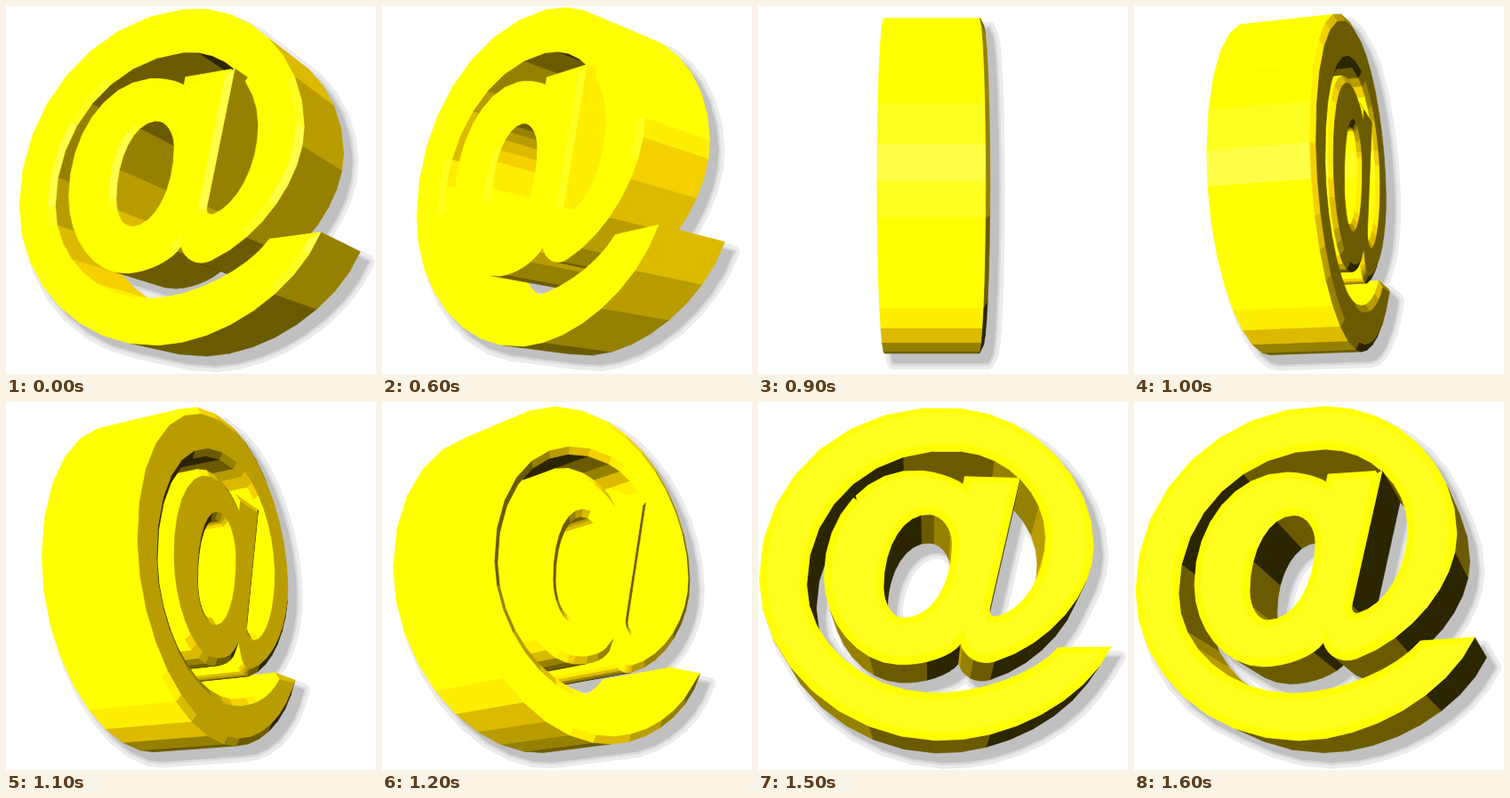
Animation of 416 by 413 pixels, one loop 1.7 s. Source, as an HTML page with a canvas:

```html
<!DOCTYPE html>
<html lang="en">
<head>
<meta charset="utf-8">
<title>Turning at sign</title>
<style>
  html, body { margin: 0; width: 100%; height: 100%; overflow: hidden; background: #fff; }
  canvas { display: block; }
</style>
</head>
<body>
<canvas id="stage" width="416" height="413"></canvas>
<script>
const ctx = document.getElementById('stage').getContext('2d');

const CENTER = { x: 197, y: 202.5 };
const FOCAL = 1300;
const PITCH = Math.asin(0.266);
const FRONT = 51, BACK = -54;
const BEVEL = { inset: 8, rise: 4 };
const DRAWN_AT = 15;   // the outline below is given as seen at this yaw
const FACETS = 8;

// Key points of the smooth runs: x, y and heading in degrees, clockwise from the right.
const ring = [
  [383, 264, 115], [185, 380, 180], [2, 212, 270], [215, 5, 0],
  [363, 148, 90], [250, 288, 160], [213, 270, 255]
];
const bowl = [[213, 270, 125], [145, 297, 180], [68, 205, 270], [172, 79, 0], [216, 90, 35]];
const stem = [[216, 90], [218, 81], [279, 77]];
const hollow = [
  [245, 228, 100], [252, 237, -15], [308, 142, 270], [215, 53, 180],
  [50, 215, 90], [178, 327, 0], [322, 268, -50]
];
const eye = [[180, 127, 180], [130, 212, 90], [150, 245, 0], [204, 158, 270], [180, 127, 180]];

const GOLD_REDS = [43, 107, 150, 184, 219, 245];
const SHADOWS = [[6.5, '#ebebeb'], [2.5, '#dadada'], [0, '#c0c0c0']];

const rad = deg => deg * Math.PI / 180;
const mix = (a, b, t) => [a[0] + (b[0] - a[0]) * t, a[1] + (b[1] - a[1]) * t];

// Yaw about the upright axis, then pitch towards the viewer.
function rotate(u, v, w, deg) {
  const c = Math.cos(rad(deg)), s = Math.sin(rad(deg));
  const cp = Math.cos(PITCH), sp = Math.sin(PITCH);
  const z = w * c + u * s;
  return [u * c - w * s, v * cp - z * sp, z * cp + v * sp];
}

function project(u, v, w, deg) {
  const [x, y, z] = rotate(u, v, w, deg);
  const k = FOCAL / (FOCAL - z);
  return [CENTER.x + x * k, CENTER.y + y * k, z];
}

function unproject([x, y]) {
  let u = 0, v = 0;
  for (let i = 0; i < 30; i++) {
    const p = project(u, v, FRONT, DRAWN_AT);
    u += x - p[0];
    v += y - p[1];
  }
  return [u, v];
}

// Where the tangents of two key points cross.
function crossing([ax, ay, a], [bx, by, b]) {
  const [ca, sa, cb, sb] = [Math.cos(rad(a)), Math.sin(rad(a)), Math.cos(rad(b)), Math.sin(rad(b))];
  const t = ((bx - ax) * sb - (by - ay) * cb) / (ca * sb - sa * cb);
  return [ax + ca * t, ay + sa * t];
}

// Joins key points by near-elliptic arcs; the last point is left to the next run.
function arcs(keys) {
  const out = [];
  for (let i = 0; i + 1 < keys.length; i++) {
    const a = keys[i], b = keys[i + 1], c = crossing(a, b);
    const p = mix(a, c, 0.55), q = mix(b, c, 0.55);
    for (let j = 0; j < FACETS; j++) {
      const t = j / FACETS;
      const mid = mix(p, q, t);
      const left = mix(mix(a, p, t), mid, t), right = mix(mid, mix(q, b, t), t);
      out.push(mix(left, right, t));
    }
  }
  return out;
}

function normal(p, q) {
  const dx = q[0] - p[0], dy = q[1] - p[1], len = Math.hypot(dx, dy) || 1;
  return [dy / len, -dx / len];
}

function makeLoop(points) {
  const pts = points.map(unproject), n = pts.length;
  const normals = pts.map((p, i) => normal(p, pts[(i + 1) % n]));
  const inset = pts.map((p, i) => {
    const a = normals[(i + n - 1) % n], b = normals[i];
    const k = BEVEL.inset / Math.max(0.6, 1 + a[0] * b[0] + a[1] * b[1]);
    return [p[0] - (a[0] + b[0]) * k, p[1] - (a[1] + b[1]) * k];
  });
  return { pts, normals, inset };
}

const loops = [
  makeLoop([[322, 268], ...arcs(ring), ...arcs(bowl), ...stem, ...arcs(hollow)]),
  makeLoop(arcs(eye))
];

function shade(u, v, w, deg) {
  const len = Math.hypot(u, v, w);
  const [x, y, z] = rotate(u / len, v / len, w / len, deg);
  const gloss = -0.1 * x - 0.13 * y + 0.985 * z;
  if (gloss > 0.985) return '#ffff47';
  if (gloss > 0.962) return '#ffff1f';
  const light = 0.76 - 0.76 * Math.max(0, x) - 0.6 * y + 1.1 * z;
  if (light > 1.06) return '#ffff00';
  if (light > 0.98) return '#ffee00';
  const miss = red => Math.abs(red - light * 255);
  const red = GOLD_REDS.reduce((a, b) => miss(b) < miss(a) ? b : a);
  return `rgb(${red}, ${Math.round(red * 0.85)}, 0)`;
}

function area(poly) {
  return poly.reduce((sum, p, i) => {
    const q = poly[(i + 1) % poly.length];
    return sum + p[0] * q[1] - q[0] * p[1];
  }, 0);
}

function buildFaces(deg) {
  const faces = [], caps = [];
  for (const { pts, normals, inset } of loops) {
    const front = pts.map(p => project(...p, FRONT, deg));
    const back = pts.map(p => project(...p, BACK, deg));
    const cap = inset.map(p => project(...p, FRONT + BEVEL.rise, deg));
    caps.push(cap);
    normals.forEach(([nu, nv], i) => {
      const j = (i + 1) % pts.length;
      const depth = front[i][2] + front[j][2];
      const wall = [front[i], front[j], back[j], back[i]];
      const edge = [front[i], front[j], cap[j], cap[i]];
      if (area(wall) < 0) {
        faces.push({ rings: [wall], depth, color: shade(nu, nv, 0, deg) });
      }
      if (area(edge) > 0) {
        const color = shade(nu * BEVEL.rise, nv * BEVEL.rise, BEVEL.inset, deg);
        faces.push({ rings: [edge], depth: depth + 0.01, color });
      }
    });
  }
  faces.sort((a, b) => a.depth - b.depth);
  if (area(caps[0]) > 0) faces.push({ rings: caps, color: shade(0, 0, 1, deg) });
  return faces;
}

function paint({ rings }, color, spread) {
  ctx.beginPath();
  for (const pts of rings) {
    pts.forEach(([x, y], i) => i ? ctx.lineTo(x, y) : ctx.moveTo(x, y));
    ctx.closePath();
  }
  ctx.fillStyle = ctx.strokeStyle = color;
  ctx.lineWidth = spread * 2 + 0.7;
  ctx.fill('evenodd');
  ctx.stroke();
}

function draw(deg) {
  const faces = buildFaces(deg);
  ctx.fillStyle = '#fff';
  ctx.fillRect(0, 0, 416, 413);
  ctx.lineJoin = 'round';
  ctx.save();
  ctx.translate(10, 11);
  for (const [spread, color] of SHADOWS) faces.forEach(f => paint(f, color, spread));
  ctx.restore();
  faces.forEach(f => paint(f, f.color, 0));
}

// A long rest, then eleven quick turns of 15 degrees.
function angleAt(ms) {
  const t = ms % 1700;
  const step = t < 600 ? 0 : Math.floor((t - 600) / 100) + 1;
  const deg = 30 + 15 * step;
  return deg < 90 ? deg : deg - 180;
}

const start = performance.now();
let shown = null;
function tick() {
  const deg = angleAt(performance.now() - start);
  if (deg !== shown) draw(shown = deg);
  requestAnimationFrame(tick);
}
tick();
</script>
</body>
</html>
```
